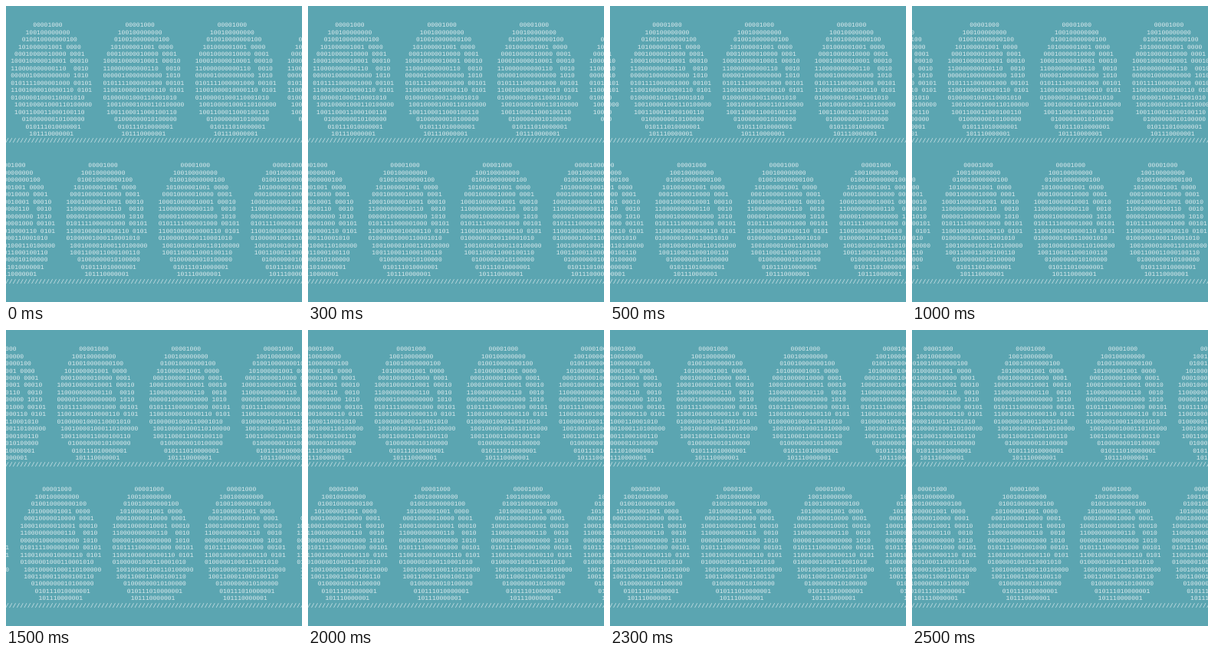
Animation of 386 by 386 pixels, one loop 3000 ms. Source, as an HTML page:

```html
<!DOCTYPE html>
<html lang="en">
<head>
<meta charset="utf-8">
<title>Binary drift</title>
<style>
  html, body {
    margin: 0;
    width: 100%;
    height: 100%;
    overflow: hidden;
    background: #5ba5b1;
  }
  main {
    position: relative;
    width: 100%;
    height: 100%;
    overflow: clip;
    contain: strict;
  }
  pre {
    position: absolute;
    margin: 0;
    color: #dcebee;
    font: 8.03px/9.47px "Liberation Mono", "Courier New", monospace;
    text-rendering: geometricPrecision;
  }
  .band { animation: drift 3s steps(6) infinite; }
  #upper { top: 21.1px; left: calc(6.3px - 25ch); }
  #lower { top: 204.4px; left: calc(78.5px - 25ch); --shift: -25ch; }
  .rule { left: -1px; }
  #rule1 { top: 171.8px; }
  #rule2 { top: 355.8px; }
  @keyframes drift {
    to { transform: translateX(var(--shift, 25ch)); }
  }
</style>
</head>
<body>
<main>
  <pre id="upper" class="band"></pre>
  <pre id="rule1" class="rule"></pre>
  <pre id="lower" class="band"></pre>
  <pre id="rule2" class="rule"></pre>
</main>
<script>
  const PERIOD = 25, COPIES = 5;
  const shape = [
    '      00001000',
    '    100100000000',
    '   010010000000100',
    '  101000001001 0000',
    ' 00010000010000 0001',
    '100010000010001 00010',
    '110000000000110  0010',
    '0000010000000000 1010',
    '0101111000001000 00101',
    '11001000010000110 0101',
    '01000001000110001010',
    ' 100100001000110100000',
    ' 1001100011000100110',
    '   01000000010100000',
    '    010111010000001',
    '     101110000001'
  ];
  const band = shape.map(row => row.padEnd(PERIOD).repeat(COPIES)).join('\n');
  const fill = (selector, text) =>
    document.querySelectorAll(selector).forEach(el => { el.textContent = text; });

  fill('.band', band);
  fill('.rule', '/'.repeat(84));
</script>
</body>
</html>
```
